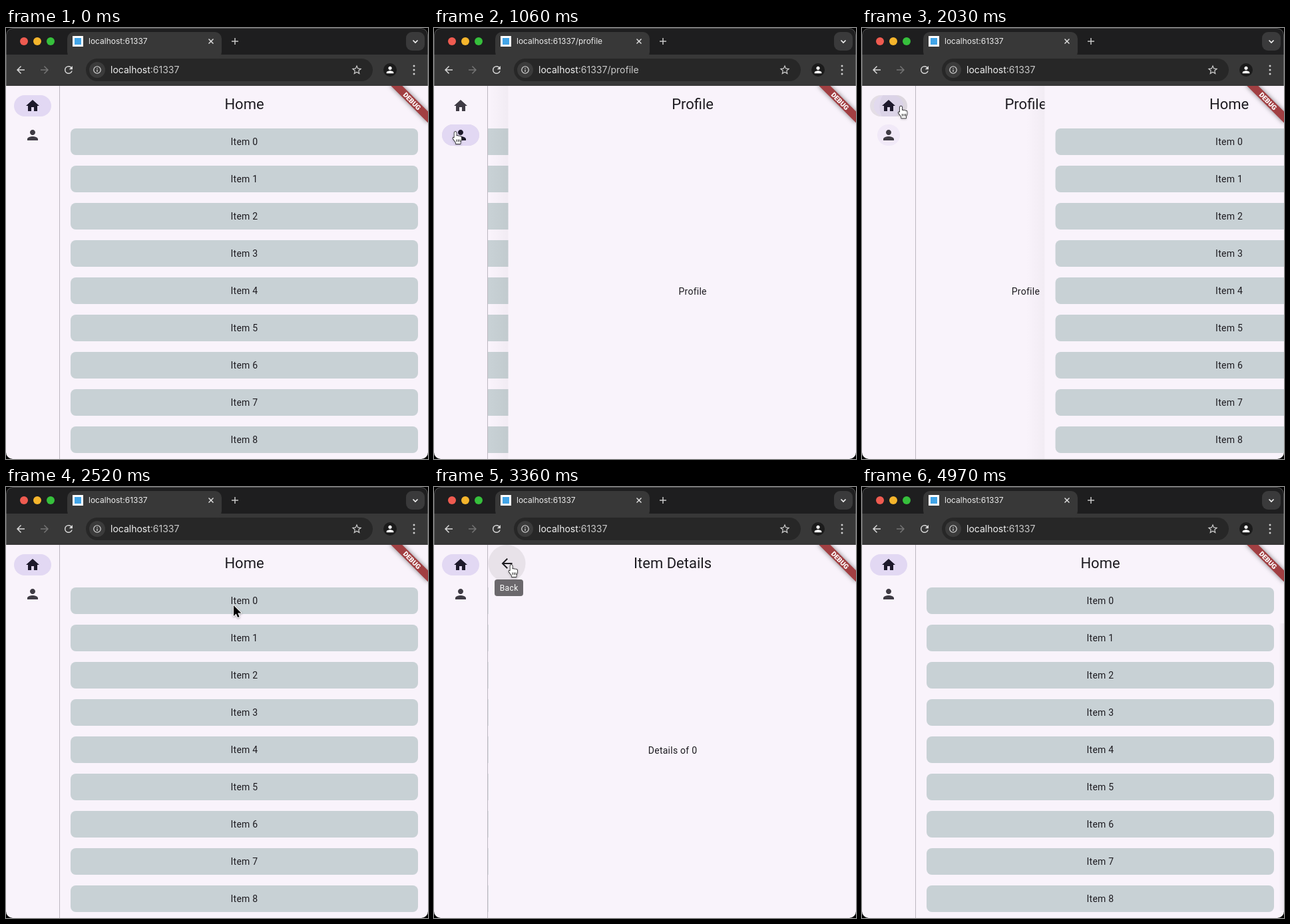
These frames come from a looping animation (634 px wide and 648 px high, 5 s). An HTML page with a canvas:

```html
<!DOCTYPE html>
<html lang="en">
<head>
<meta charset="utf-8">
<title>Navigation demo</title>
<style>
  html, body { margin: 0; width: 100%; height: 100%; overflow: hidden; background: #000; }
  canvas { display: block; }
</style>
</head>
<body>
<canvas id="stage" width="634" height="648"></canvas>
<script>
const ctx = document.getElementById('stage').getContext('2d');
const LOOP = 5000, W = 634, H = 648, LEFT = 81, TOP = 87, PAGE = W - LEFT, SLIDE = 500;
const BG = '#f9f3fb', INK = '#1d1b20', MUTED = '#3f3b44';
const ROBOTO = 'Roboto, sans-serif', INTER = 'Inter, sans-serif';

const icons = {
  home: 'M10 20v-6h4v6h5v-8h3L12 3 2 12h3v8z',
  person: 'M12 12c2.21 0 4-1.79 4-4s-1.79-4-4-4-4 1.79-4 4 1.79 4 4 4zm0 2c-2.67 0-8 1.34-8 4v2h16v-2c0-2.66-5.33-4-8-4z',
  back: 'M20 11H7.83l5.59-5.59L12 4l-8 8 8 8 1.41-1.41L7.83 13H20z',
  reload: 'M17.65 6.35C16.2 4.9 14.21 4 12 4a8 8 0 1 0 7.73 10h-2.08A6 6 0 1 1 12 6c1.66 0 3.14.69 4.22 1.78L13 11h7V4z',
  info: 'M11 7h2v2h-2zm0 4h2v6h-2zm1-9a10 10 0 1 0 0 20 10 10 0 0 0 0-20zm0 18a8 8 0 1 1 0-16 8 8 0 0 1 0 16z',
  star: 'M22 9.24l-7.19-.62L12 2 9.19 8.63 2 9.24l5.46 4.73L5.82 21 12 17.27 18.18 21l-1.63-7.03zM12 15.4l-3.76 2.27 1-4.28-3.32-2.88 4.38-.38L12 6.1l1.71 4.04 4.38.38-3.32 2.88 1 4.28z',
  arrow: 'M0 0V16L3.7 12.5 6.2 18 8.6 17 6.2 11.5H11.5z',
  hand: 'M-1.5 1.5a1.6 1.6 0 0 1 3.2 0v5a1.5 1.5 0 0 1 2.6.3 1.5 1.5 0 0 1 2.6.5 1.4 1.4 0 0 1 2.3 1.2v3.5l-1.5 3.5v2.5h-7v-2l-4-5.5c-1-1.5.6-2.5 1.8-1.2z'
};
for (const name in icons) icons[name] = new Path2D(icons[name]);

const clamp = v => Math.max(0, Math.min(1, v));
const ramp = (t, start, length) => clamp((t - start) / length);
const smooth = v => v * v * (3 - 2 * v);

// Cubic Bezier easing between two arbitrary end points
function bezier(x0, y0, x1, y1, x2, y2, x3, y3) {
  const at = (s, a, b, c, d) => {
    const r = 1 - s;
    return r * r * r * a + 3 * r * r * s * b + 3 * r * s * s * c + s * s * s * d;
  };
  return x => {
    let lo = 0, hi = 1;
    for (let i = 0; i < 24; i++) {
      const mid = (lo + hi) / 2;
      if (at(mid, x0, x1, x2, x3) < x) lo = mid; else hi = mid;
    }
    return at(lo, y0, y1, y2, y3);
  };
}
const fastStart = bezier(0, 0, .056, .024, .108, .3085, .198, .541);
const slowEnd = bezier(.198, .541, .3655, 1, .5465, .989, 1, 1);
const easePage = p => p >= 1 ? 1 : p < .198 ? fastStart(p) : slowEnd(p);
const easeUnder = bezier(0, 0, .35, .91, .33, .97, 1, 1);

const moves = [
  { at: -SLIDE, to: 'home', path: '' },
  { at: 808, from: 'home', to: 'profile', path: '/profile' },
  { at: 1910, from: 'profile', to: 'home', path: '' },
  { at: 2650, from: 'home', to: 'item', path: '/items/0' },
  { at: 3360, from: 'item', to: 'home', path: '', pop: true }
];

// time, x, y
const track = [
  [30, 652, 330], [560, 32, 156], [1300, 32, 156], [1620, 37, 113], [1950, 37, 113],
  [2450, 342, 178], [2720, 342, 178], [3140, 116, 117], [3400, 116, 117],
  [3730, 122, 183], [3880, 122, 183], [4550, 652, 300]
];

function pointer(t) {
  const i = track.findIndex(k => k[0] > t);
  if (i < 1) return null;
  const [t0, x0, y0] = track[i - 1], [t1, x1, y1] = track[i];
  const p = smooth((t - t0) / (t1 - t0));
  return { x: x0 + (x1 - x0) * p, y: y0 + (y1 - y0) * p };
}

function box(x, y, w, h, r, fill) {
  ctx.beginPath();
  ctx.roundRect(x, y, w, h, r);
  ctx.fillStyle = fill;
  ctx.fill();
}
const disc = (x, y, r, fill) => box(x - r, y - r, 2 * r, 2 * r, r, fill);

function line(points, color, width = 1.5) {
  ctx.beginPath();
  points.forEach(([x, y]) => ctx.lineTo(x, y));
  ctx.strokeStyle = color;
  ctx.lineWidth = width;
  ctx.stroke();
}

function icon(name, x, y, size, color, flip = 1) {
  ctx.save();
  ctx.translate(x, y);
  ctx.scale(size / 24 * flip, size / 24);
  ctx.translate(-12, -12);
  ctx.fillStyle = color;
  ctx.fill(icons[name], 'evenodd');
  ctx.restore();
}

function text(str, x, y, font, color, align = 'left', spacing = 0) {
  ctx.font = font;
  ctx.letterSpacing = spacing + 'px';
  ctx.textAlign = align;
  ctx.fillStyle = color;
  ctx.fillText(str, x, y);
}

function drawBrowser(path) {
  box(0, 0, W, TOP, 0, '#1e1e1f');
  box(0, 40, W, TOP - 40, 0, '#383838');
  box(92, 6, 232, 40, 10, '#383838');
  ['#ef5b50', '#f5b52c', '#36c03c'].forEach((c, i) => disc(27 + 20 * i, 20, 6, c));

  box(100, 12, 16, 16, 0, '#fff');
  box(103, 15, 10, 10, 0, '#42a5e8');
  text('localhost:61337' + path, 124, 24, '12px ' + INTER, '#ececec');
  line([[304.5, 16.5], [311.5, 23.5]], '#dedede');
  line([[311.5, 16.5], [304.5, 23.5]], '#dedede');
  line([[339, 20], [349, 20]], '#c8c8c8');
  line([[344, 15], [344, 25]], '#c8c8c8');
  box(601, 6, 28, 28, 9, '#3a3a3b');
  line([[611.5, 18.5], [615, 22], [618.5, 18.5]], '#f0f0f0', 1.7);

  icon('back', 22, 63, 18, '#d8d8d8');
  icon('back', 58, 63, 18, '#747474', -1);
  icon('reload', 94, 63, 18, '#d8d8d8');
  box(120, 46, 431, 34, 17, '#272727');
  disc(137, 63, 12, '#3b3b3b');
  icon('info', 137, 63, 14, '#dedede');
  const host = 'localhost', font = '14px ' + INTER;
  text(host, 157, 68, font, '#f0f0f0');
  text(':61337' + path, 157 + ctx.measureText(host).width, 68, font, '#c9c9c9');
  icon('star', 527, 63, 18, '#d0d0d0');
  disc(577, 63, 10, '#1b1b1b');
  icon('person', 577, 63, 16, '#fff');
  [57, 63, 69].forEach(y => disc(613, y, 1.5, '#cfcfcf'));
}

const pages = {
  home() {
    text('Home', 358, 122, '22px ' + ROBOTO, INK, 'center');
    for (let i = 0; i < 9; i++) {
      const y = 151 + 56 * i;
      box(97, y, 522, 40, 8, '#c8d1d5');
      text('Item ' + i, 358, y + 25, '14px ' + ROBOTO, INK, 'center', .25);
    }
  },
  profile() {
    text('Profile', 358, 122, '22px ' + ROBOTO, INK, 'center');
    text('Profile', 358, 401, '14px ' + ROBOTO, INK, 'center', .25);
  },
  item(t) {
    disc(109, 115, 28, `rgba(29,27,32,${.08 * ramp(t, 3060, 100)})`);
    icon('back', 109, 115, 24, INK);
    text('Item Details', 358, 122, '22px ' + ROBOTO, INK, 'center');
    text('Details of 0', 358, 401, '14px ' + ROBOTO, INK, 'center', .25);
  }
};

function drawPage(name, offset, t, raised) {
  ctx.save();
  ctx.translate(offset, 0);
  if (raised) {
    const shade = ctx.createLinearGradient(LEFT - 28, 0, LEFT, 0);
    shade.addColorStop(0, 'rgba(0,0,0,0)');
    shade.addColorStop(1, 'rgba(0,0,0,.03)');
    box(LEFT - 28, TOP, 28, H, 0, shade);
  }
  box(LEFT, TOP, PAGE, H, 0, BG);
  pages[name](t);
  ctx.restore();
}

function drawPages(move, t) {
  ctx.save();
  ctx.beginPath();
  ctx.rect(LEFT, TOP, PAGE, H);
  ctx.clip();
  const p = ramp(t, move.at, SLIDE);
  const over = easePage(p), under = easeUnder(p);
  if (p >= 1) {
    drawPage(move.to, 0, t);
  } else if (move.pop) {
    drawPage(move.to, -PAGE / 3 * (1 - under), t);
    drawPage(move.from, PAGE * over, t, true);
  } else {
    drawPage(move.from, -PAGE / 3 * under, t);
    drawPage(move.to, PAGE * (1 - over), t, true);
  }
  // faint edge left after the last page has gone
  if (t > 3870) {
    const edge = ctx.createLinearGradient(626, 0, W, 0);
    edge.addColorStop(0, 'rgba(40,30,50,0)');
    edge.addColorStop(1, 'rgba(40,30,50,.06)');
    box(626, 205, 8, 432, 0, edge);
  }
  ctx.restore();

  const tip = ramp(t, 3130, 150) * (1 - ramp(t, 3370, 75));
  if (tip) {
    ctx.globalAlpha = tip;
    box(91, 139, 43, 25, 4, '#6b686c');
    text('Back', 112.7, 156, '12px ' + ROBOTO, '#fff', 'center', .4);
    ctx.globalAlpha = 1;
  }
}

function drawDestination(name, y, chosen, press, release, cursor, t) {
  const hover = cursor && cursor.x > 12 && cursor.x < 68 && Math.abs(cursor.y - y) < 16;
  if (hover) box(12, y - 16, 56, 32, 16, '#e4dee6');
  if (chosen) {
    const w = 56 * (.4 + .6 * smooth(chosen));
    ctx.globalAlpha = chosen;
    box(40 - w / 2, y - 16, w, 32, 16, '#e2d8f3');
    ctx.globalAlpha = 1;
  }
  const fade = 1 - ramp(t, release, 200);
  if (t > press && fade > 0 && cursor) {
    ctx.save();
    ctx.beginPath();
    ctx.roundRect(12, y - 16, 56, 32, 16);
    ctx.clip();
    const r = 14 * ramp(t, press, 80) + 30 * ramp(t, release, 200);
    disc(cursor.x, cursor.y + 1, r, `rgba(29,27,32,${.09 * fade})`);
    ctx.restore();
  }
  icon(name, 40, y, 24, chosen > .5 ? '#1d192b' : MUTED);
}

function drawRail(cursor, t) {
  box(0, TOP, 80, H, 0, BG);
  box(80, TOP, 1, H, 0, '#bdb7c0');
  const profile = ramp(t, 808, 200) * (1 - ramp(t, 1910, 200));
  const home = t < 1500 ? 1 - ramp(t, 808, 200) : ramp(t, 1910, 200);
  drawDestination('home', 117, home, 1800, 1910, cursor, t);
  drawDestination('person', 161, profile, 730, 808, cursor, t);
}

function drawBanner() {
  ctx.save();
  ctx.beginPath();
  ctx.rect(LEFT, TOP, PAGE, H);
  ctx.clip();
  ctx.translate(W, TOP - 1);
  ctx.rotate(Math.PI / 4);
  ctx.shadowColor = 'rgba(0,0,0,.5)';
  ctx.shadowBlur = 7;
  box(-40, 28, 80, 12, 0, '#a13f42');
  ctx.shadowColor = 'transparent';
  text('DEBUG', 0, 37.6, '900 10.2px ' + ROBOTO, '#fff', 'center');
  ctx.restore();
}

function drawCursor({ x, y }, pointing) {
  ctx.save();
  ctx.translate(x, y);
  const shape = icons[pointing ? 'hand' : 'arrow'];
  ctx.lineJoin = 'round';
  ctx.shadowColor = 'rgba(0,0,0,.35)';
  ctx.shadowBlur = 3;
  ctx.shadowOffsetY = 1;
  ctx.lineWidth = pointing ? 1.3 : 2;
  ctx.strokeStyle = pointing ? '#000' : '#fff';
  ctx.stroke(shape);
  ctx.shadowColor = 'transparent';
  ctx.fillStyle = pointing ? '#fff' : '#000';
  ctx.fill(shape);
  if (pointing) {
    [2, 4.6, 7].forEach(fx => line([[fx, 11.5], [fx, 15]], '#000', .9));
  }
  ctx.restore();
}

function draw() {
  const t = performance.now() % LOOP;
  const move = moves.filter(m => m.at <= t).pop();
  const cursor = pointer(t);
  ctx.clearRect(0, 0, W, H);
  ctx.save();
  ctx.beginPath();
  ctx.roundRect(0, 0, W, H, 10);
  ctx.clip();
  drawBrowser(move.path);
  drawPages(move, t);
  drawRail(cursor, t);
  drawBanner();

  ctx.save();
  ctx.beginPath();
  ctx.rect(0, 0, W, TOP);
  ctx.clip();
  ctx.beginPath();
  ctx.roundRect(.5, .5, W - 1, H - 1, 10);
  ctx.strokeStyle = 'rgba(255,255,255,.24)';
  ctx.lineWidth = 1;
  ctx.stroke();
  ctx.restore();

  if (cursor) {
    const onRail = cursor.x < 80 && cursor.y > 97 && cursor.y < 181;
    const onBack = move.to === 'item' && Math.hypot(cursor.x - 109, cursor.y - 115) < 28;
    drawCursor(cursor, onRail || onBack || (t >= 3360 && t < 3400));
  }
  ctx.restore();
  requestAnimationFrame(draw);
}
draw();
</script>
</body>
</html>
```
